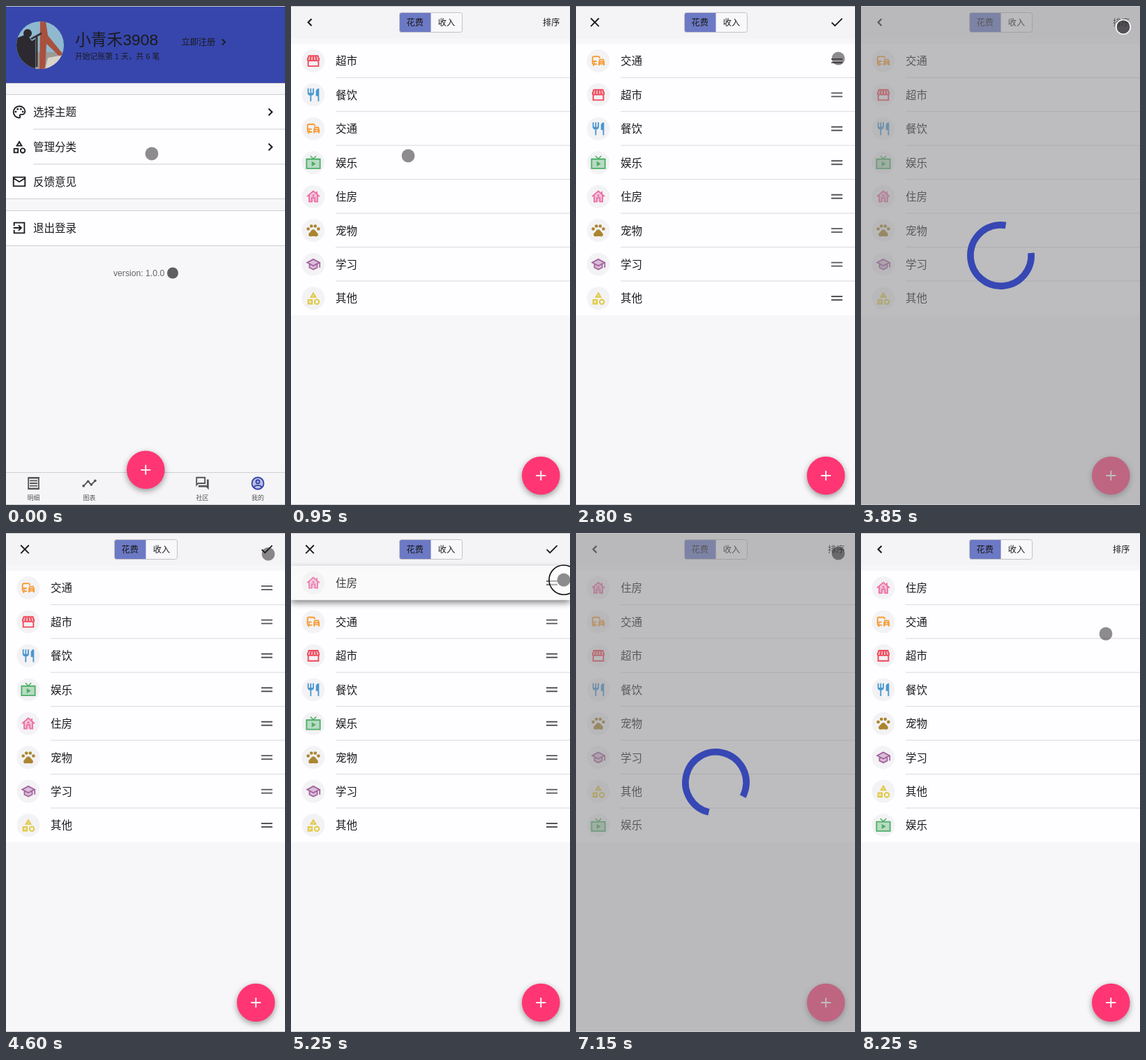
Recreate the animation shown at these times as an HTML page. Size 400 by 713 pixels, loop 8.3 s.

```html
<!DOCTYPE html>
<html lang="zh-CN">
<head>
<meta charset="utf-8">
<title>记账</title>
<style>
  html, body { margin: 0; width: 100%; height: 100%; overflow: hidden; background: #f7f6f8; }
  svg { display: block; width: 400px; height: 713px; }
  text { font-family: "Liberation Sans", "Noto Sans CJK SC", "Noto Sans CJK", sans-serif; fill: #1b1b1d; }
  .fab { filter: drop-shadow(0 3px 4px rgba(0, 0, 0, .38)); }
  .lifted { filter: drop-shadow(0 4px 5px rgba(0, 0, 0, .5)); }
</style>
</head>
<body>
<svg id="stage" viewBox="0 0 400 713"></svg>
<script>
const LOOP = 8300, ROW = 48.45, FIRST = 78.5;
const INK = '#1b1b1d', BLUE = '#3646ad', LINE = '#cfced1';

// ---- drawing helpers ----
const rect = (x, y, w, h, fill, more = '') =>
  `<rect x="${x}" y="${y}" width="${w}" height="${h}" fill="${fill}" ${more}/>`;
const disc = (x, y, r, fill, more = '') =>
  `<circle cx="${x}" cy="${y}" r="${r}" fill="${fill}" ${more}/>`;
const label = (x, y, size, str, more = '') =>
  `<text x="${x}" y="${y}" font-size="${size}" ${more}>${str}</text>`;
const fill = d => `<path fill="currentColor" fill-rule="evenodd" d="${d}"/>`;
const tint = d => `<path fill="currentColor" opacity=".35" d="${d}"/>`;
const stroke = (d, w = 2) => `<path fill="none" stroke="currentColor" stroke-width="${w}" d="${d}"/>`;
const dots = (r, ...pts) => pts.map(([x, y]) => disc(x, y, r, 'currentColor')).join('');
const icon = (name, x, y, color = INK, s = .92) =>
  `<g transform="translate(${x} ${y}) scale(${s}) translate(-12 -12)" color="${color}">${icons[name]}</g>`;
const fab = (x, y) => `<g class="fab">${disc(x, y, 27.3, '#ff3673')}</g>` +
  `<path d="M${x - 7} ${y}h14M${x} ${y - 7}v14" stroke="#fff" stroke-width="1.8"/>`;

const shapes = 'M12 2l-5.5 9h11zm0 3.84L13.93 9h-3.87zM17.5 13a4.5 4.5 0 1 0 0 9 4.5 4.5 0 0 0 0-9zm0 2a2.5 2.5 0 1 1 0 5 2.5 2.5 0 0 1 0-5zM3 13.5h8v8H3zm2 2v4h4v-4z';
const icons = {
  palette: stroke('M12 21a9 9 0 1 1 0-18c5 0 9 3.6 9 8 0 2.8-2.2 5-5 5h-1.8a1.5 1.5 0 0 0-1.1 2.5c.9 1 .3 2.5-1.1 2.5z') +
    dots(1.5, [6.5, 11.5], [9.5, 7.5], [14.5, 7.5], [17.5, 11.5]),
  category: fill(shapes),
  mail: stroke('M3 5h18v14H3zM3 6.5l9 5.8 9-5.8'),
  exit: stroke('M4 9V4h16v16H4v-5M3 12h12M10.8 7.7l4.3 4.3-4.3 4.3'),
  right: stroke('M9.3 6.7l5.3 5.3-5.3 5.3', 2.3),
  left: stroke('M14.7 6.7L9.4 12l5.3 5.3', 2.3),
  close: stroke('M5.7 5.7l12.6 12.6M18.3 5.7L5.7 18.3'),
  check: stroke('M4 12.3l5 5L20.3 6'),
  receipt: stroke('M4 4h16v16H4zM6 8h12M6 12h12M6 16h12') +
    stroke('M3.2 3h18M3.2 21h18', 1.6),
  chart: stroke('M3 16l7-7 5 5 6-6') + dots(2, [3, 16], [10, 9], [15, 14], [21, 8]),
  forum: stroke('M3 3h13v9H5.6L3 14.6z') + fill('M19 6h3v16l-4-4H6v-3h13z'),
  user: disc(12, 12, 10, 'currentColor', 'opacity=".3"') + disc(12, 12, 9.2, 'none', 'stroke="currentColor" stroke-width="2"') +
    disc(12, 9.5, 2.7, 'none', 'stroke="currentColor" stroke-width="2"') + stroke('M5.6 18.2c3-4 9.8-4 12.8 0'),
  store: tint('M5 4h14l2 6H3z') +
    stroke('M4 12v8h16v-8M5 4h14l2 5.5a2.2 2.2 0 0 1-4.5 0 2.2 2.2 0 0 1-4.5 0 2.2 2.2 0 0 1-4.5 0 2.2 2.2 0 0 1-4.5 0zM8.5 4l-1 5.5M12 4v5.5M15.5 4l1 5.5'),
  food: fill('M16 6v8h3v8h2V2c-2.8 0-5 2.2-5 4zm-5 3H9V2H7v7H5V2H3v7c0 2.2 1.8 4 4 4v9h2v-9c2.2 0 4-1.8 4-4V2h-2z'),
  commute: stroke('M14 8V7c0-1.2-.8-2-2-2H5c-1.2 0-2 .8-2 2v8c0 1.2.8 2 2 2h5M3 12.5h6.5M6 17l-2 2.5') + dots(1.1, [5.7, 15]) +
    tint('M14 10h6l1 3.5h-8z') + stroke('M13 13.5l1.2-3.7h5.6l1.2 3.7v3h-8zM13 13.5h8', 1.7) + fill('M12.2 16h2v3h-2zM19.8 16h2v3h-2z') +
    dots(.9, [14.8, 15], [19.2, 15]),
  tv: tint('M2 6.5h20v14H2z') + stroke('M1.5 6.5h21v14.5h-21z') + stroke('M7.5 1.5L12 6l4.5-4.5', 1.6) + fill('M9.5 9.8v8l6.5-4z'),
  home: tint('M5 11l7-6.5 7 6.5v9H5z') + stroke('M2.3 12L12 3.5l9.7 8.5M5.5 10v10h4v-6h5v6h4V10M17.5 8V4') +
    dots(1.7, [12, 10.5]),
  pets: dots(2.5, [4, 9.5], [9, 5.2], [15, 5.2], [20, 9.5]) +
    fill('M12 10.5c2 0 3 1.6 4.2 3 1.4 1.6 3.6 3 3.3 5.2-.3 2-2 2.9-4 2.6-1.2-.2-2.3-.4-3.5-.4s-2.3.2-3.5.4c-2 .3-3.7-.6-4-2.6-.3-2.2 1.9-3.6 3.3-5.2 1.2-1.4 2.2-3 4.2-3z'),
  school: tint('M2 9l10-5.5L22 9l-4 3v5l-6 3-6-3v-5z') +
    stroke('M2.5 9L12 4l9.5 5-9.5 5.2zM6 11v6l6 3 6-3v-6M22 9v8'),
  other: tint('M12 4l4 6H8zM4 14.5h6v6H4z') + fill(shapes)
};

// ---- pages ----
const menuRow = (y, name, str, arrow) => icon(name, 19, y, INK) + label(39, y + 5.8, 15.5, str) +
  (arrow ? icon('right', 379, y) : '');
const tab = (x, name, str, color) => icon(name, x, 682, color) +
  label(x, 706, 9, str, 'text-anchor="middle" style="fill:#555"');
const panel = (y, h) => rect(-1, y + .5, 402, h, '#fefdff', `stroke="${LINE}"`);

const avatar = `<clipPath id="round">${disc(49, 56, 34, '#000')}</clipPath><g clip-path="url(#round)">
  ${rect(15, 22, 68, 68, '#8fb9cf')}${rect(15, 66, 68, 24, '#9b9a98')}
  <path fill="#a8513e" d="M49 22h8l3 20 21 26v8L58 54l-2 36h-8z"/>
  <path fill="#d9d3c9" d="M60 74l22-4v20H56z"/>
  <path fill="#2c2a30" d="M15 46l15-6 7 10 5-3v43H15z"/>${disc(31, 39, 6, '#2c2a30')}
  <path d="M36 47l15-8M44 43v44" stroke="#37343a" stroke-width="3"/></g>`;

const profile = rect(0, 0, 400, 713, '#f7f6f8') + rect(0, 0, 400, 110, BLUE) + rect(0, 110, 400, 1, LINE) +
  avatar + label(99, 56, 22.8, '小青禾3908') + label(99, 75.5, 10.8, '开始记账第 1 天，共 6 笔') +
  label(251.5, 56, 12.2, '立即注册') + icon('right', 312, 51.5, INK, .78) +
  panel(126, 149) + rect(39, 175.5, 361, 1, LINE) + rect(39, 225.5, 361, 1, LINE) +
  menuRow(151.5, 'palette', '选择主题', 1) + menuRow(201.5, 'category', '管理分类', 1) + menuRow(251, 'mail', '反馈意见') +
  panel(292, 50) + menuRow(317, 'exit', '退出登录') +
  label(154, 385.5, 12.2, 'version: 1.0.0', 'style="fill:#666"') + disc(239, 381.5, 8, '#5f5f61') +
  rect(0, 666, 400, 47, '#f5f4f6') + rect(0, 666, 400, 1, LINE) +
  tab(39.5, 'receipt', '明细', '#555') + tab(119.5, 'chart', '图表', '#555') +
  tab(281.5, 'forum', '社区', '#555') + tab(361, 'user', '我的', BLUE) + fab(200.3, 662.8);

const items = [
  ['store', '超市', '#f0475a'], ['food', '餐饮', '#4a97cf'], ['commute', '交通', '#f79a32'], ['tv', '娱乐', '#4caf67'],
  ['home', '住房', '#ec6fa5'], ['pets', '宠物', '#ab8530'], ['school', '学习', '#a5619f'], ['other', '其他', '#dfc83e']
];
const itemRow = ([name, str, color]) => `<g class="row">
  ${rect(0, -24.5, 400, 49, '#fefdff', 'class="plate"')}
  <g class="body">${disc(32, 0, 16.4, '#f3f2f4')}${icon(name, 32, 0, color)}${label(64, 5.8, 15.5, str)}
  <path class="edit" d="M366 -2.6h16M366 2.4h16" stroke="#555457" stroke-width="1.9"/></g>
  ${rect(64, 23.3, 336, 1, '#dad9dc', 'class="rule"')}</g>`;

const manage = rect(0, 0, 400, 713, '#f7f6f8') + rect(0, 0, 400, 46, '#f4f3f5') + rect(0, 54, 400, 388, '#fefdff') +
  `<g id="rows">${items.map(itemRow).join('')}</g>` +
  `<g class="view">${icon('left', 27, 23.3)}${label(361, 27.8, 12.2, '排序')}</g>` +
  `<g class="edit">${icon('close', 27, 23.3)}${icon('check', 374, 23.3)}</g>` +
  rect(155.5, 9.5, 90, 28, '#f8f7f9', 'rx="3"') +
  '<path d="M200.500 9.500h-42a3 3 0 0 0-3 3v22a3 3 0 0 0 3 3h42z" fill="#6c79c4"/>' +
  rect(155.5, 9.5, 90, 28, 'none', 'rx="3" stroke="#c3c2c8"') +
  label(177.7, 27.8, 12.2, '花费', 'text-anchor="middle"') + label(223, 27.8, 12.2, '收入', 'text-anchor="middle"') +
  fab(358.3, 671);

const stage = document.getElementById('stage');
stage.innerHTML = `<g>${profile}</g><g id="manage">${manage}</g>
  <g id="loading">${rect(0, 0, 400, 713, '#8c8b8e', 'opacity=".56"')}
  <circle id="spin" cx="200.5" cy="356.500" r="43.6" fill="none" stroke="#3748b4" stroke-width="9.6" pathLength="360" stroke-dasharray="284 76"/></g>
  ${rect(0, 0, 400, 1, '#c9c8cc')}${rect(0, 712, 400, 1, '#c9c8cc')}
  <g id="pointer"><circle id="ring" stroke-width="1.6" fill="#fff" fill-opacity=".4"/>
  <circle id="dot" r="9.4" fill="#1c1a1e"/></g>`;
const $ = id => document.getElementById(id);
const rows = [...stage.querySelectorAll('.row')].map(g => ({
  g, plate: g.querySelector('.plate'), body: g.querySelector('.body'), rule: g.querySelector('.rule')
}));
const edits = stage.querySelectorAll('.edit'), view = stage.querySelector('.view');

// ---- timeline ----
const path = [
  [75, 209, 211], [200, 168, 214], [1240, 168, 214], [1550, 376, 24], [1900, 376, 24], [2080, 376, 28],
  [2280, 376, 176], [2370, 376, 176], [2640, 376, 75], [2940, 376, 75], [3200, 376, 30], [4640, 376, 30],
  [4850, 388, 268], [4930, 388, 268], [5200, 391, 67], [5450, 391, 67], [5680, 380, 272], [5790, 380, 272],
  [6070, 372, 417], [6160, 372, 417], [6345, 367, 88], [6390, 367, 88], [6650, 376, 29], [7550, 376, 29], [7900, 351, 144]
];
const presses = [[450, 600], [1640, 1780], [2300, 2660], [3260, 3400], [3850, 4010], [4880, 5360], [5730, 6110], [6710, 6850]];
const editing = [[1750, 3430], [4060, 6880]];
const loads = [[3420, 3960], [6870, 7500]];
const drags = [
  { from: 2, to: 0, start: 2300, end: 2660 },
  { from: 4, to: 0, start: 4880, end: 5360 },
  { from: 4, to: 7, start: 5730, end: 6110 }
];
const SETTLE = 130;

const clamp = v => Math.min(1, Math.max(0, v));
const smooth = v => (v = clamp(v), v * v * (3 - 2 * v));
const within = (spans, t) => spans.some(([a, b]) => t >= a && t < b);

function cursor(t) {
  const i = path.findIndex(p => p[0] > t);
  if (i === 0) return path[0].slice(1);
  if (i < 0) return path[path.length - 1].slice(1);
  const [a, ax, ay] = path[i - 1], [b, bx, by] = path[i], k = smooth((t - a) / (b - a));
  return [ax + (bx - ax) * k, ay + (by - ay) * k];
}

// Row offsets in pixels from the first slot, plus the row being held.
function layout(t) {
  const order = items.map((_, i) => i), y = [];
  let held = -1, lift = 0;
  let shift = () => 0;
  for (const d of drags) {
    if (t < d.start) break;
    if (t >= d.end + SETTLE) {
      order.splice(d.to, 0, order.splice(d.from, 1)[0]);
      continue;
    }
    const moved = cursor(Math.min(t, d.end))[1] - cursor(d.start)[1];
    const drop = smooth((t - d.end) / SETTLE), dir = Math.sign(d.to - d.from);
    held = order[d.from];
    lift = smooth((t - d.start) / 100) * (1 - drop);
    shift = i => {
      if (i === d.from) return moved + ((d.to - d.from) * ROW - moved) * drop;
      const gap = (i - d.from) * dir;
      if (gap < 0 || gap > Math.abs(d.to - d.from)) return 0;
      return -dir * ROW * smooth((moved * dir / ROW - gap + .6) / .3);
    };
    break;
  }
  order.forEach((id, i) => y[id] = i * ROW + shift(i));
  return { y, held, lift };
}

function drawRows(t) {
  const { y, held, lift } = layout(t);
  if (held >= 0 && $('rows').lastChild !== rows[held].g) $('rows').appendChild(rows[held].g);
  rows.forEach((r, id) => {
    const up = id === held ? lift : 0;
    r.g.setAttribute('transform', `translate(0 ${FIRST + y[id]})`);
    r.plate.setAttribute('fill', up ? '#fafafa' : 'none');
    r.plate.setAttribute('class', up > .3 ? 'plate lifted' : 'plate');
    r.plate.setAttribute('opacity', up ? .95 : 1);
    r.body.setAttribute('opacity', 1 - .15 * up);
    r.rule.setAttribute('opacity', id === held || y[id] > 6.9 * ROW ? 0 : 1);
  });
}

function drawPointer(t) {
  const [x, y] = cursor(t), ring = $('ring');
  const press = presses.find(([a, b]) => t >= a && t < b + 90);
  $('pointer').setAttribute('transform', `translate(${x} ${y})`);
  $('dot').setAttribute('opacity', press && t < press[0] + 60 ? .65 : .5);
  ring.setAttribute('opacity', press ? 1 - clamp((t - press[1]) / 90) : 0);
  if (!press) return;
  const grow = smooth((t - press[0]) / 140);
  ring.setAttribute('r', 10.2 + 10.8 * grow);
  ring.setAttribute('stroke', grow < .2 ? '#fff' : '#111');
  ring.setAttribute('fill-opacity', .4 * grow);
}

function render(t) {
  const slide = 1 - Math.pow(1 - clamp((t - 570) / 300), 3);
  $('manage').setAttribute('transform', `translate(${400 * (1 - slide)} 0)`);
  const edit = within(editing, t);
  edits.forEach(e => e.setAttribute('visibility', edit ? 'visible' : 'hidden'));
  view.setAttribute('visibility', edit ? 'hidden' : 'visible');
  drawRows(t);
  const fade = Math.max(...loads.map(([a, b]) => Math.min(clamp((t - a) / 100), clamp((b - t) / 100))));
  $('loading').setAttribute('opacity', fade);
  $('spin').setAttribute('transform', `rotate(${-5 + (t - 3850) * .36} 200.5 356.5)`);
  drawPointer(t);
}

const began = performance.now();
(function tick() {
  render((performance.now() - began) % LOOP);
  requestAnimationFrame(tick);
})();
</script>
</body>
</html>
```
